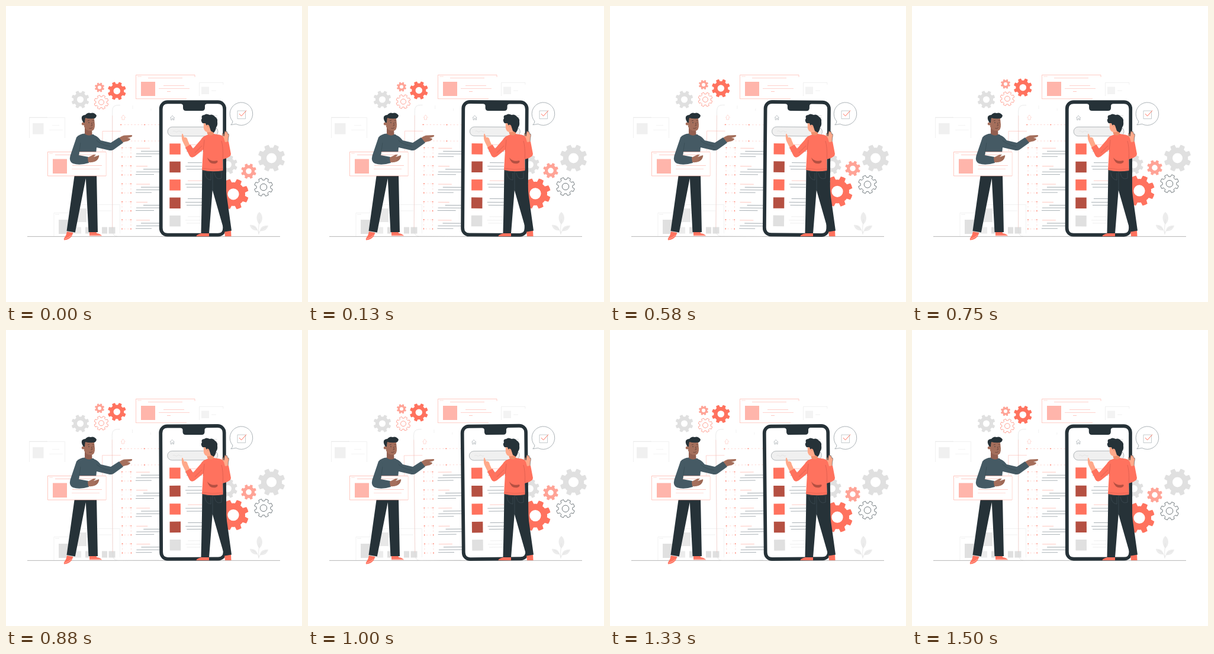
Animation, 500 px wide and 500 px high, one loop 1.54 s. Source, as an HTML page with a canvas:

```html
<!DOCTYPE html>
<html lang="en">
<head>
<meta charset="utf-8">
<title>App wireframe</title>
<style>
html, body { margin: 0; width: 100%; height: 100%; overflow: hidden; background: #fff; }
canvas { display: block; width: 100vw; height: 100vh; }
</style>
</head>
<body>
<canvas id="stage"></canvas>
<script>
const canvas = document.getElementById('stage');
const ctx = canvas.getContext('2d');
const LOOP = 1540, STEPS = 37, LIFT = 6;
const INK = '#263238', CORAL = '#ff725e', BLUSH = '#ffb5ab', ROSE = '#ffa396';
const RUST = '#b55042', GREY = '#e0e0e0', PALE = '#ececec', SLATE = '#455a64';
const BROWN = '#a56f5c', PEACH = '#ffa98a', TEXT = '#64727a';

function fill(d, color) {
  ctx.fillStyle = color;
  ctx.fill(new Path2D(d));
}

function stroke(d, color, width = 0.6) {
  ctx.strokeStyle = color;
  ctx.lineWidth = width;
  ctx.stroke(new Path2D(d));
}

function box(x, y, w, h, color) {
  ctx.fillStyle = color;
  ctx.fillRect(x, y, w, h);
}

function rule(x1, x2, y, color, width = 0.6) {
  stroke(`M${x1} ${y}H${x2}`, color, width);
}

function disc(x, y, r, color) {
  ctx.fillStyle = color;
  ctx.beginPath();
  ctx.arc(x, y, r, 0, Math.PI * 2);
  ctx.fill();
}

function gear(x, y, r, color, outline = false) {
  ctx.beginPath();
  for (let i = 0; i < 8; i++) {
    const a = 0.4 + i * Math.PI / 4;
    ctx.arc(x, y, r, a - 0.17, a + 0.17);
    ctx.arc(x, y, r * 0.77, a + 0.25, a + 0.53);
  }
  ctx.closePath();
  ctx.moveTo(x + r * 0.37, y);
  ctx.arc(x, y, r * 0.37, 0, Math.PI * 2);
  if (outline) {
    ctx.strokeStyle = color;
    ctx.lineWidth = 0.65;
    ctx.stroke();
  } else {
    ctx.fillStyle = color;
    ctx.fill('evenodd');
  }
}

function swing(x, y, degrees, draw) {
  ctx.save();
  ctx.translate(x, y);
  ctx.rotate(degrees * Math.PI / 180);
  ctx.translate(-x, -y);
  draw();
  ctx.restore();
}

function drawBackdrop() {
  stroke('M219.5 157V116.5H319V120M219.5 156.7H305', ROSE, 0.55);
  rule(222, 229, 119, BLUSH, 0.5);
  box(228, 128, 24, 24, BLUSH);
  rule(240, 298, 121.7, ROSE, 0.5);
  rule(266, 301, 134.5, ROSE, 0.5);
  rule(258, 310, 139.4, ROSE, 0.5);
  rule(272, 278, 144.5, ROSE);

  stroke('M326.5 152V129.5H367V133', GREY, 0.5);
  box(330, 136.5, 13, 12.5, '#f3f3f3');
  rule(347, 355, 143, GREY, 0.5);

  stroke('M39.5 223V188.5H99.5V223', PALE, 0.7);
  rule(39, 70, 188.2, '#ddd', 0.6);
  box(45, 198, 18.5, 18.5, '#f0f0f0');
  rule(78, 90, 201.5, PALE);
  rule(73, 96, 209.5, PALE);

  stroke('M115 335.5H192.5V384M81 389V349.5H138M136 346H178', PALE, 0.7);
  rule(83, 90, 352, '#ddd', 0.5);
  box(112, 342, 24, 23, '#e8e8e8');
  box(89, 361, 23, 24, GREY);
  box(112, 373.5, 15, 11, PALE);
  box(134, 373.5, 19, 11, GREY);
  box(162, 373.5, 9, 11, GREY);
  box(173.5, 373.5, 11, 11, GREY);

  fill('M428 369C422 363 422 352 428 348C434 352 435 363 428 369Z', PALE);
  fill('M425 379C418 380 413 376 412 370C419 369 424 373 425 379Z', PALE);
  fill('M429 380C429 374 435 370 443 371C441 378 436 381 429 380Z', PALE);
  stroke('M428 360Q426 375 427 386M416 372Q425 376 427 384M440 373Q430 377 427 384', GREY, 0.7);

  rule(36, 463, 389.4, '#999', 0.7);
}

function drawGears(lift) {
  gear(125.5, 158, 15, GREY);
  gear(448.5, 257, 23, GREY);
  gear(375, 268, 16, GREY);
  ctx.save();
  ctx.translate(0, -lift);
  gear(158, 137.5, 8.2, ROSE);
  gear(187.3, 143.5, 15.5, CORAL);
  gear(161, 162.5, 12, CORAL, true);
  gear(410, 279, 13, ROSE);
  gear(435, 306, 15.5, INK, true);
  gear(384, 317.8, 26, CORAL);
  ctx.restore();
}

function drawWireframe() {
  stroke('M258 389H189Q179.7 389 179.7 379V177Q179.7 167.5 189 167.5H193', '#d4d4d4', 0.5);
  stroke('M179.7 185V375', BLUSH, 0.4);
  stroke('M214 168V174M245 177V173', '#e4e4e4', 0.5);
  stroke('M194 211.5H163V245', BLUSH, 0.55);
  stroke('M194.5 189L198 184L202 189M196 188V192H200V188', BLUSH, 0.5);

  ctx.setLineDash([2.2, 3.5]);
  stroke('M194 200.5H262M194 228H262', BLUSH, 0.55);
  for (let i = 0; i < 5; i++) {
    const y = 239.5 + i * 30.4;
    stroke(`M196 ${y}H211V${y + 15.5}H196Z`, BLUSH, 0.5);
  }
  ctx.setLineDash([]);

  for (const x of [194, 234]) for (const y of [200.5, 228]) disc(x, y, 0.85, CORAL);
  for (let i = 0; i < 5; i++) {
    const y = 239.5 + i * 30.4;
    for (const x of [196, 211]) {
      disc(x, y, 0.85, CORAL);
      disc(x, y + 15.5, 0.85, CORAL);
    }
    const shift = i % 2 ? 4 : 0;
    rule(220, 243 - shift, y + 0.7, ROSE, 0.6);
    rule(228 + shift, 259, y + 5.8, TEXT, 0.6);
    rule(220, 259, y + 10.3, TEXT, 0.55);
    rule(219, 246 + shift, y + 14.7, TEXT, 0.55);
  }
}

function drawPhone() {
  ctx.beginPath();
  ctx.roundRect(258.8, 159.3, 113.2, 230.3, 14);
  ctx.fillStyle = INK;
  ctx.fill();
  fill('M273 165.3H295Q299 165.3 299 169V172Q299 177 304 177H331Q336 177 336 172V169Q336 165.3 340 165.3H358Q366.3 165.3 366.3 174V375Q366.3 383.7 358 383.7H273Q264.6 383.7 264.6 375V174Q264.6 165.3 273 165.3Z', '#fff');

  stroke('M277.5 189L281 185L284.5 189M278.5 188V192.5H280.5V190H282.5V192.5H284V188', '#90999e', 0.55);
  stroke('M350 185H357M350 188H357', '#bbb', 0.5);
  ctx.beginPath();
  ctx.roundRect(273, 204.3, 85, 15.5, 7.7);
  ctx.fillStyle = '#f0f0f0';
  ctx.fill();
  ctx.strokeStyle = '#8c9498';
  ctx.lineWidth = 0.65;
  ctx.stroke();
  stroke('M282 212Q284 210 286 212T290 212T294 212T298 212', GREY, 0.8);

  [CORAL, RUST, CORAL, RUST, GREY].forEach((color, i) => {
    const y = 232.3 + i * 30.4;
    box(276.3, y, 18.5, 18.5, color);
    const line = i === 4 ? GREY : TEXT;
    rule(307, 331, y + 2, i % 2 || i === 4 ? line : ROSE, 0.55);
    rule(303, 331, y + 8, line, 0.55);
    rule(305, 331, y + 13, line, 0.55);
  });
}

function drawBubble() {
  stroke('M383 195A19.3 19.3 0 1 1 388.5 199.3Q385 200 379.8 200.8Q382.5 198.5 383 195Z', '#68757b', 0.55);
  stroke('M391 177H404.5V190.5H391Z', '#a8b0b3', 0.65);
  stroke('M394 182L397.5 186L406 176.5', CORAL, 1);
}

function drawPresenter() {
  fill('M103 381L113.5 383L111 389Q106 395 98 395.5Q97 393 99 391Q102 387 103 381Z', CORAL);
  fill('M141 381H152L153.5 384Q159 384.5 162 388.3H141Z', CORAL);
  stroke('M99 393.5Q106 392 111 387M141 387.2H161', '#fff', 0.4);
  fill('M116 284H153L155 382H139.5L134.8 291L116.8 382.5L102.5 380Z', INK);

  // Pointing hand and arm
  fill('M191 223Q197 218 202 218.5L212 218Q214.5 219 212 221L205 223Q210 223 210 225Q208 228 202 229L195 231Z', BROWN);
  fill('M148 218Q154 219 160 227L177 231L191 222L198 231L182 242.5Q178 245 173 243.5L149 238Z', SLATE);
  stroke('M150 224Q158 234 176 237', '#354850', 0.6);
  fill('M119 222Q124 216 133 215.5L148 217Q154 222 153.5 235L152 249H118Z', SLATE);

  fill('M133 203L145 207L145.5 217Q140 221 133 216Z', '#925f50');
  fill('M131 190Q140 184 149 190L150 200Q150.5 210 144.5 211Q136 212 132 204Z', BROWN);
  disc(130.3, 199, 2.5, BROWN);
  fill('M131 197Q127 192 128 187Q130 184 134 184Q138 179 143 181Q149 179 153 185Q152 190 148 190Q140 191 134 189Q133 193 133 197Z', INK);
  disc(140, 197, 0.7, INK);
  disc(147.2, 197, 0.6, INK);
  stroke('M137.8 194L141 193M145.7 193L148.5 194M144.5 197L145.5 202L143.3 202.4M140.5 206.5Q143.5 207.5 146 205.5', '#4a302b', 0.6);

  box(70.5, 246.5, 99, 40.5, '#fff');
  stroke('M169 246.5H70.5V287H169', ROSE, 0.6);
  stroke('M169.2 247V287', BLUSH, 0.5);
  box(79, 258.5, 24, 24.5, BLUSH);
  rule(83, 148, 251.5, ROSE, 0.55);
  rule(73, 79, 249, BLUSH, 0.5);
  rule(112, 162, 269.5, ROSE, 0.55);
  rule(111, 158, 275.3, BLUSH, 0.5);

  // Supporting arm
  fill('M119 222Q124 219 126 226L123 252L139 255L140 265Q124 270 113 266Q106 263 108.5 253Z', SLATE);
  fill('M138 256L148 251L152 251L148 255L157 252Q158 254 155 259Q151 265 139 264Z', BROWN);
  stroke('M150 258L156 254.5M150 261L155.5 257.5', '#80503f', 0.5);
  stroke('M123 251L126 231', '#354850', 0.6);
}

function drawTester() {
  fill('M330.5 382L343 383.5V389H321.5Q322 386 329 384.5Z', CORAL);
  fill('M369 380.5L380 379.5L380.5 389H370Z', CORAL);
  fill('M331.5 275H366.5Q371 300 373 322L381 379.5L369 381.5L348.8 311L343 384H329.5Q331 325 331.5 275Z', INK);
  stroke('M336 282Q337 293 346 294V282M352 282Q354 295 364 291V281M349 280L349 311M332 279H366', '#4b5960', 0.5);

  // Raised palm
  const palm = 'M365 229L365.5 216Q366 213 367.3 216L368 220L369.5 211.5Q371 210 371.5 213L373 212Q374.5 213 374 216L376 216Q377 218 375.5 223L375 232';
  fill(palm, PEACH);
  stroke(palm, INK, 0.5);

  // Finger on the search field
  fill('M304 240L299.5 231Q296 225 297 217Q298 214 299 217L301 222Q306 221 307 227L311 236Z', PEACH);
  fill('M340 218Q333 219 329 226L316 241L311.5 234L303 239L310 253Q313 258 319 254L335 241Z', CORAL);
  fill('M336 220L345 215L357 217Q365 217 368 223L370 230L376 229L380 250Q380 256 366 259L366.5 278Q347 281 331 277L333 243Z', CORAL);
  stroke('M335 226L333 246M364 228Q367 238 366.5 258M319 248L331 236', '#cf5749', 0.6);
  stroke('M331.5 274Q348 277.5 366 275', '#cf5749', 0.5);
  fill('M340 256Q346 264 357 261Q359 264 354 266Q343 268 340 256Z', RUST);

  fill('M338 199L351 199L351 216Q347 221 340 216Z', '#f08e6b');
  fill('M333.5 195L346 195L347 212Q337 216 334 207Z', PEACH);
  fill('M332 198Q328 193 331 190Q329 184 335 184Q338 181 344 184Q349 182 353 187Q358 190 357 196Q358 201 355 205Q354 211 351 214L346 211L343 202L339 204L337 198Z', INK);
  disc(340.5, 203, 2.5, PEACH);
  stroke('M340 202Q342 202 341 204.5', '#c86f50', 0.5);
}

function render(time) {
  const phase = Math.floor((time % LOOP + 3) / (LOOP / STEPS)) % STEPS / STEPS;
  const lift = LIFT * (1 - Math.abs(1 - 2 * phase));
  // Linear swing: zero, one degree right, one degree left, zero.
  const tilt = phase < 0.25 ? 4 * phase : phase < 0.75 ? 2 - 4 * phase : 4 * phase - 4;

  const ratio = window.devicePixelRatio || 1;
  const width = Math.round(innerWidth * ratio), height = Math.round(innerHeight * ratio);
  if (canvas.width !== width || canvas.height !== height) {
    canvas.width = width;
    canvas.height = height;
  }
  ctx.setTransform(width / 500, 0, 0, height / 500, 0, 0);
  box(0, 0, 500, 500, '#fff');

  drawBackdrop();
  drawGears(lift);
  swing(219, 278, tilt, drawWireframe);
  swing(315.4, 274.5, tilt, drawPhone);
  drawBubble();
  drawPresenter();
  drawTester();
}

const start = performance.now();
function tick() {
  render(performance.now() - start);
  requestAnimationFrame(tick);
}
tick();
</script>
</body>
</html>
```
